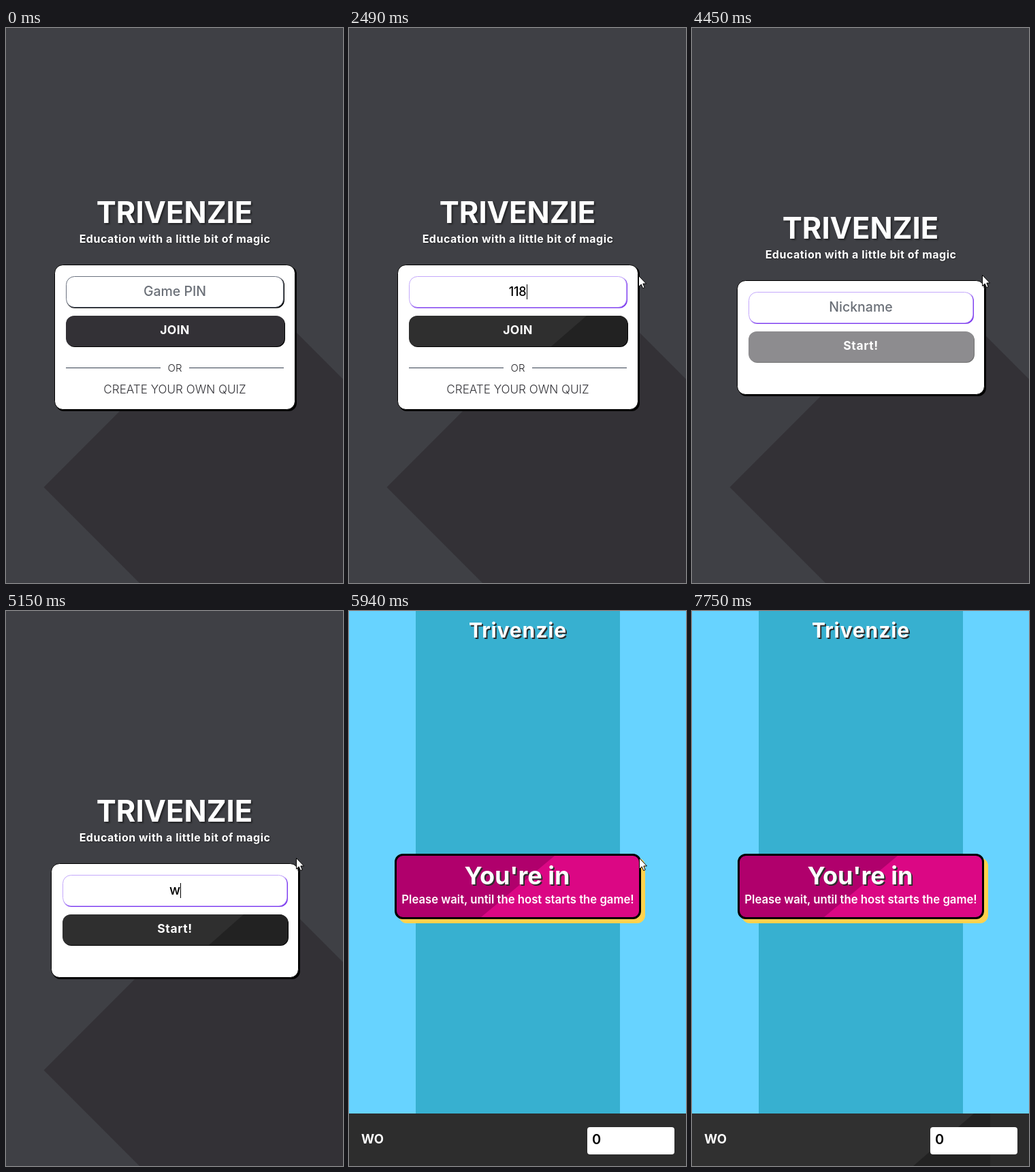
Recreate the animation shown at these times as an HTML page. Size 495 by 814 pixels, loop 8000 ms.

```html
<!DOCTYPE html>
<html lang="en">
<head>
<meta charset="utf-8">
<title>Quiz game</title>
<style>
  html, body { margin: 0; height: 100%; overflow: hidden; background: #3f4045; }
  svg { display: block; width: 100vw; height: 100vh; }
  text { font-family: Inter, Roboto, sans-serif; font-weight: 700; fill: #fff; text-anchor: middle; }
  .title { font-size: 43.5px; filter: drop-shadow(2px 2px 1px #0007); }
  .tag { font-size: 16px; letter-spacing: .5px; filter: drop-shadow(1px 1px 1px #0006); }
  .card { fill: #fff; stroke: #000; }
  .field { fill: #fff; stroke: #6b7280; }
  .focus .field { stroke: #c4a9fb; }
  .focus .edge { fill: #7c3aed; }
  .button { fill: #333136; }
  .lit .button { fill: #2f2f2f; }
  .shine { fill: #222; visibility: hidden; }
  .lit .shine { visibility: visible; }
  .hint, .typed { font-size: 19.5px; font-weight: 500; fill: #6b7078; }
  .typed { fill: #000; }
  .pin { font-size: 18px; letter-spacing: -.3px; }
  .small { font-size: 15px; font-weight: 300; fill: #26262a; }
  .link { font-size: 17.1px; font-weight: 300; fill: #333338; }
  .pop { filter: drop-shadow(2px 2.5px 0 #2d2d2d); }
  .semi { font-weight: 600; }
  .left { text-anchor: start; }
</style>
</head>
<body>
<svg viewBox="0 0 495 814" preserveAspectRatio="none">
  <clipPath id="joinClip"><rect x="88" y="422" width="321" height="45" rx="12"/></clipPath>
  <clipPath id="startClip"><rect x="83" y="445" width="331" height="45" rx="12"/></clipPath>
  <clipPath id="panelClip"><rect x="69" y="358" width="358" height="92" rx="10"/></clipPath>

  <g id="home">
    <path fill="#3f4045" d="M0 0H495V814H0Z"/>
    <path fill="#333136" d="M55.5 673.5L354.5 374.5L495 515V814H196Z"/>
    <g id="heading">
      <text class="title" x="247.5" y="286">TRIVENZIE</text>
      <text class="tag" x="248" y="315">Education with a little bit of magic</text>
    </g>

    <g id="join">
      <rect x="73" y="349" width="354" height="213" rx="12"/>
      <rect class="card" x="71.5" y="347.5" width="353" height="212" rx="12"/>
      <rect class="edge" x="89" y="365" width="320" height="46" rx="12"/>
      <rect class="field" x="88.5" y="364.5" width="319" height="45" rx="12"/>
      <text class="hint" x="248" y="393">Game PIN</text>
      <text class="typed pin" x="247.5" y="393"></text>
      <g class="action">
        <rect x="89" y="423" width="321" height="45" rx="12"/>
        <rect class="button" x="88" y="422" width="321" height="45" rx="12"/>
        <path class="shine" clip-path="url(#joinClip)" d="M349 422H409V467H297Z"/>
        <text x="248" y="449" font-size="17.5" letter-spacing=".4">JOIN</text>
      </g>
      <path stroke="#374151" d="M88 498.5H227M269 498.5H408"/>
      <text class="small" x="248" y="504">OR</text>
      <text class="link" x="248" y="536">CREATE YOUR OWN QUIZ</text>
    </g>

    <g id="nick" class="focus">
      <rect x="68" y="372" width="364" height="168" rx="12"/>
      <rect class="card" x="66.5" y="370.5" width="363" height="167" rx="12"/>
      <rect class="edge" x="84" y="388" width="330" height="46" rx="12"/>
      <rect class="field" x="83.5" y="387.5" width="329" height="45" rx="12"/>
      <text class="hint" x="248" y="416">Nickname</text>
      <text class="typed" x="248" y="416"></text>
      <g class="action">
        <rect x="84" y="446" width="331" height="45" rx="12"/>
        <rect class="button" x="83" y="445" width="331" height="45" rx="12"/>
        <path class="shine" clip-path="url(#startClip)" d="M349 445H414V490H298Z"/>
        <text x="248" y="472" font-size="17.5" letter-spacing=".6">Start!</text>
      </g>
    </g>
    <path id="caret" stroke="#000" d="M.5 0V22"/>
  </g>

  <g id="lobby">
    <path fill="#67d3ff" d="M0 0H495V814H0Z"/>
    <path fill="#37b0d0" d="M98 0H398V737H98Z"/>
    <text class="pop" x="248" y="39" font-size="30" letter-spacing=".9">Trivenzie</text>
    <rect fill="#ffd24d" x="73" y="362" width="362" height="96" rx="12"/>
    <g clip-path="url(#panelClip)">
      <path fill="#b0006c" d="M67 356H429V452H67Z"/>
      <path fill="#db0784" d="M305.6 356H429V452H190.4Z"/>
    </g>
    <rect fill="none" stroke="#000" stroke-width="3" x="68.5" y="357.5" width="359" height="93" rx="10.5"/>
    <text class="pop" x="247" y="401" font-size="36">You're in</text>
    <text class="semi" x="248" y="429" font-size="16.7">Please wait, until the host starts the game!</text>
    <path fill="#2d2d2d" d="M0 737H495V814H0Z"/>
    <g id="barShade">
      <path fill="#303030" d="M0 737H438V814H0Z"/>
      <path fill="#222" d="M414 737H438V814H325Z"/>
      <path fill="#2b2b2b" d="M438 737H495V814H438Z"/>
    </g>
    <text class="left" x="18" y="781" font-size="18.5">WO</text>
    <rect fill="#fff" x="350" y="757" width="128" height="40" rx="4"/>
    <text class="left semi" x="357" y="782" font-size="20" style="fill:#000">0</text>
  </g>

  <g id="mouse">
    <path id="arrow" fill="#fff" stroke="#000" d="M.5 .5V16.5L4.2 13L6.7 18.7L9.2 17.6L6.8 12H11.5Z"/>
    <path id="beam" fill="none" stroke="#000" d="M-3-7.5H0M1-7.5H4M.5-7V7M-3 7.5H0M1 7.5H4"/>
  </g>
</svg>
<script>
const LOOP = 8000, SWAP = 4450, ENTER = 5940;
const $ = id => document.getElementById(id);
const clamp = v => Math.min(1, Math.max(0, v));
const prog = (t, a, b) => clamp((t - a) / (b - a));
const show = (el, on) => { el.style.display = on ? '' : 'none'; };

const pinTimes = [1950, 2070, 2310, 2800, 3090, 3340, 3590];
const nickTimes = [5150, 5320];
// Pointer stops: time, x, y
const path = [
  [500, 487, 519], [1230, 358, 399], [1340, 358, 399], [1520, 421, 365],
  [1700, 421, 365], [1760, 422, 365], [2250, 422, 365], [2620, 426, 362],
  [6550, 426, 362], [6670, 426, 358], [6800, 426, 358], [6850, 426, 356],
  [7510, 426, 356], [7750, 441, 350]
];

function pointerAt(t) {
  const i = Math.max(1, path.findIndex(p => p[0] > t));
  const [t0, x0, y0] = path[i - 1], [t1, x1, y1] = path[i];
  let k = prog(t, t0, t1);
  if (i === 1) k = 1 - (1 - k) ** 2;
  return [Math.round(x0 + (x1 - x0) * k), Math.round(y0 + (y1 - y0) * k)];
}

// Fills the field and returns the caret position
function type(form, word, times, t) {
  const out = form.querySelector('.typed');
  const n = times.filter(s => t >= s).length;
  out.textContent = word.slice(0, n);
  show(form.querySelector('.hint'), n === 0);
  return n ? Math.round(248 + out.getComputedTextLength() / 2) : 248;
}

function caretOn(t) {
  return t >= 1190 && t < 1760 || t >= 1950 && t < 4090 || t >= 4510 && t < 5630;
}

function buttonOpacity(t) {
  if (t < SWAP) return 1 - .5 * prog(t, 4030, 4270);
  if (t < 5570) return .5 + .5 * prog(t, 4430, 4630);
  return 1 - .5 * prog(t, 5570, 5810);
}

function drawHome(t) {
  const second = t >= SWAP, form = second ? $('nick') : $('join');
  show($('join'), !second);
  show($('nick'), second);
  $('heading').setAttribute('transform', `translate(0 ${second ? 23 : 0})`);
  form.classList.toggle('focus', second || t >= 1190);
  form.classList.toggle('lit', t >= (second ? 4630 : 740));
  form.querySelector('.action').style.opacity = buttonOpacity(t);
  const x = second ? type(form, 'wo', nickTimes, t) : type(form, '1186861', pinTimes, t);
  $('caret').setAttribute('transform', `translate(${x} ${second ? 399 : 376})`);
  show($('caret'), caretOn(t));
}

function draw(t) {
  const inLobby = t >= ENTER;
  show($('home'), !inLobby);
  show($('lobby'), inLobby);
  show($('barShade'), t >= 6010);
  if (!inLobby) drawHome(t);

  const moving = t >= 500 && t < 7750;
  show($('mouse'), moving);
  if (!moving) return;
  const [x, y] = pointerAt(t), overField = x < 409 && y < 411;
  $('mouse').setAttribute('transform', `translate(${x} ${y})`);
  show($('beam'), overField);
  show($('arrow'), !overField);
}

const start = performance.now();
function tick() {
  draw((performance.now() - start) % LOOP);
  requestAnimationFrame(tick);
}
tick();
</script>
</body>
</html>
```
